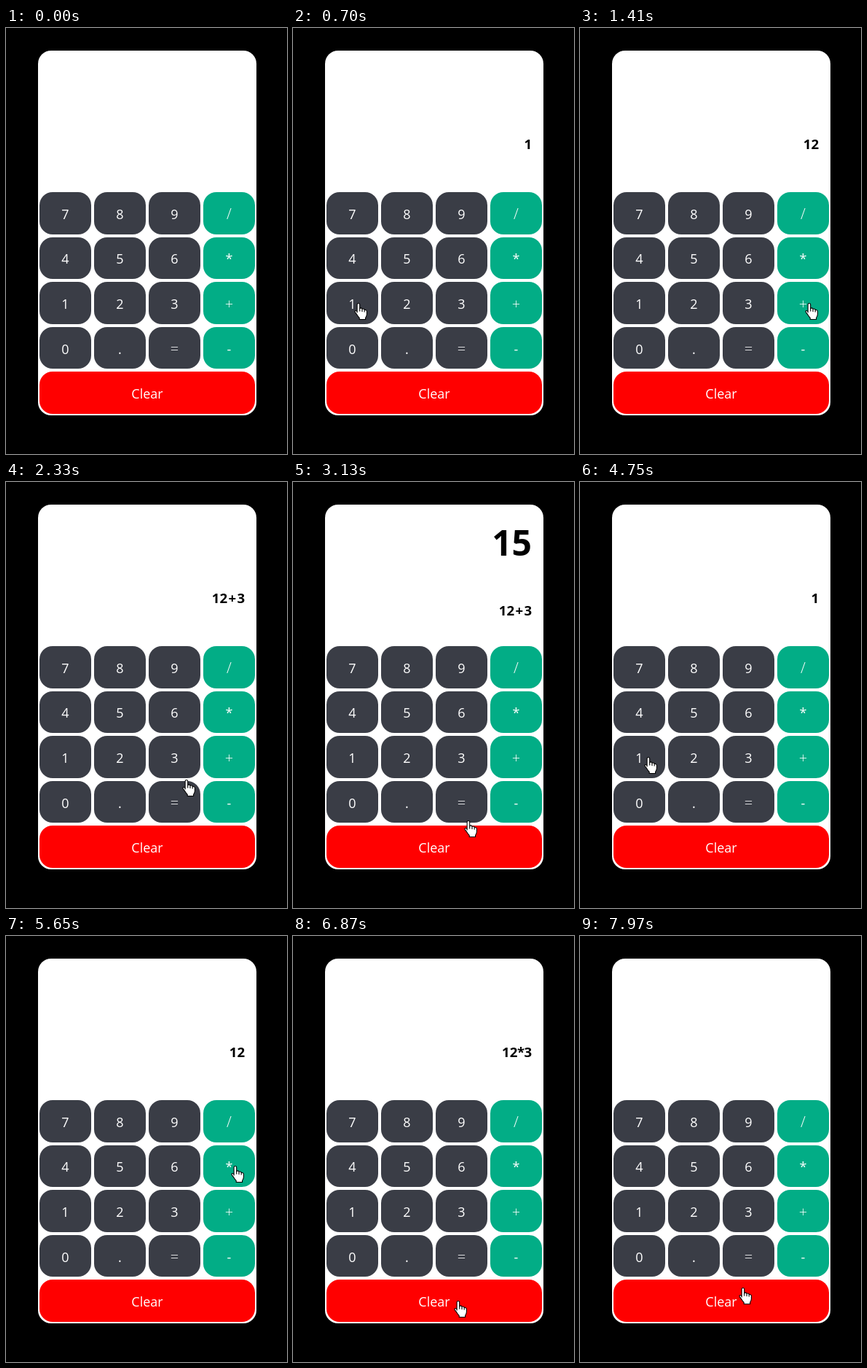
These frames come from a looping animation (386 px wide and 584 px high, 8000 ms). An HTML page:

```html
<!DOCTYPE html>
<html lang="en">
<head>
<meta charset="utf-8">
<title>Calculator</title>
<style>
  html, body { margin: 0; width: 100%; height: 100%; overflow: hidden; background: #000; }
  svg { display: block; width: 386px; height: 584px; }
  text { font-family: "Open Sans", "Noto Sans", sans-serif; text-anchor: middle; }
  .label { fill: #fff; font-size: 18px; }
  .sign { font-size: 20px; font-weight: 300; }
  .display { font-weight: 700; fill: #000; }
</style>
</head>
<body>
<svg viewBox="0 0 386 584">
  <rect width="386" height="584" fill="#000"/>
  <rect x="44" y="31" width="300" height="500" rx="18" fill="#fff"/>
  <g id="keys"></g>
  <g id="expr" class="display" font-size="18.6"></g>
  <text id="result" class="display" x="328" y="101" font-size="48" style="text-anchor:end"></text>
  <g id="cursor" fill="#fff" stroke="#000" stroke-width="1.1" stroke-linejoin="round">
    <path id="arrow" d="M.5 .8V16.5L4.2 13L6.6 18.6L9 17.6L6.6 12.2H11.7Z"/>
    <g id="hand">
      <path d="M-1.9 13V2.2Q-1.9 .5 -.1 .5Q1.7 .5 1.7 2.2V7.6Q2.2 6.8 3.4 6.9Q4.8 7 5 8.4Q5.6 7.8 6.7 8Q8 8.2 8.2 9.5Q8.8 9 9.8 9.4Q11.4 9.9 11.4 11.6V15.5Q11.2 18 9.6 20.3V22.5H1.2V20.4Q-.6 18.6 -2 16.2L-4.6 12.8Q-5.5 11.2 -4.2 10.6Q-3.2 10.3 -1.9 12.2Z"/>
      <path d="M1.7 7.6V11.5M5 8.4V12M8.2 9.5V12.5" fill="none"/>
    </g>
  </g>
</svg>
<script>
const LOOP = 8000, STEP = 100, TRAVEL = 400;
const PANEL_BOTTOM = 531, KEY_W = 71, KEY_H = 57.6, GAP = 4;
const $ = id => document.getElementById(id);

// Places the pointer can visit: every key, plus where it comes in and ends up
const places = { enter: [104, 542], rest: [216, 482] };

function add(parent, tag, attrs, text = "") {
  const el = document.createElementNS("http://www.w3.org/2000/svg", tag);
  for (const k in attrs) el.setAttribute(k, attrs[k]);
  el.textContent = text;
  parent.append(el);
}

function addKey(label, col, row, width, fill) {
  const x = 46 + col * (KEY_W + GAP), top = 225 + row * (KEY_H + GAP);
  const y = Math.round(top), height = Math.round(top + KEY_H) - y;
  const cx = x + width / 2;
  add($("keys"), "rect", { x, y, width, height, rx: 18, fill });
  add($("keys"), "text", {
    x: cx, y: Math.round(top + 36.8), class: "/+=".includes(label) ? "label sign" : "label"
  }, label);
  places[label] = [cx, top + KEY_H / 2];
}

[..."789/456*123+0.=-"].forEach((c, i) =>
  addKey(c, i % 4, Math.floor(i / 4), KEY_W, i % 4 === 3 ? "#02ad86" : "#3a3d46"));
addKey("Clear", 0, 4, 4 * KEY_W + 3 * GAP, "#f00");

// The pointer presses each key at its time, then heads for the next one
const stops = [
  { at: 100, key: "enter" },
  { at: 700, key: "1" }, { at: 1000, key: "2" }, { at: 1630, key: "+" },
  { at: 2130, key: "3" }, { at: 2930, key: "=", dx: 24 }, { at: 3630, key: "Clear", dx: 33, dy: -11 },
  { at: 4650, key: "1" }, { at: 5150, key: "2" }, { at: 5750, key: "*" },
  { at: 6350, key: "3" }, { at: 7470, key: "Clear", dx: 33 },
  { at: 7870, key: "Clear", dx: 33 }, { at: 7970, key: "rest" }
];

const ops = { "+": (a, b) => a + b, "-": (a, b) => a - b, "*": (a, b) => a * b, "/": (a, b) => a / b };

function press(state, key) {
  if (key === "Clear") return { expr: "", result: "" };
  if (key === "=") {
    const [, a, op, b] = state.expr.match(/^([\d.]+)(\D)([\d.]+)$/);
    return { ...state, result: String(ops[op](+a, +b)) };
  }
  return key.length === 1 ? { ...state, expr: state.expr + key } : state;
}

const easeInOut = u => u < 0.5 ? 4 * u ** 3 : 1 - 4 * (1 - u) ** 3;

function tip({ key, dx = 8, dy = 0 }) {
  const [x, y] = places[key];
  return [x + dx, y + dy];
}

function pointerAt(i, elapsed) {
  const from = stops[i], to = stops[i + 1] || from;
  const e = easeInOut(Math.min(1, elapsed / Math.min(TRAVEL, to.at - from.at || TRAVEL)));
  const end = tip(to);
  return tip(from).map((v, k) => Math.round(v + (end[k] - v) * e));
}

const advance = { "+": 13.2, "*": 8.9 };

function showDisplay({ expr, result }) {
  $("result").textContent = result;
  $("expr").replaceChildren();
  let right = 328.2;
  for (const c of [...expr].reverse()) {
    const w = advance[c] || 10.8;
    add($("expr"), "text", { x: right - w / 2, y: result ? 183 : 166 }, c);
    right -= w;
  }
}

let shown;

function render(ms) {
  const t = (ms + 0.5) % LOOP;
  const passed = stops.filter(s => s.at <= t), i = passed.length - 1;
  if (i !== shown) {
    showDisplay(passed.reduce((state, s) => press(state, s.key), { expr: "", result: "" }));
    shown = i;
  }
  $("cursor").style.display = i < 0 ? "none" : "";
  if (i < 0) return;
  const elapsed = Math.floor((t - stops[i].at) / STEP) * STEP;
  const [x, y] = pointerAt(i, elapsed);
  const outside = y > PANEL_BOTTOM;
  $("cursor").setAttribute("transform", `translate(${x} ${y})`);
  $("arrow").style.display = outside ? "" : "none";
  $("hand").style.display = outside ? "none" : "";
}

const begin = performance.now();
function tick() {
  render(performance.now() - begin);
  requestAnimationFrame(tick);
}
tick();
</script>
</body>
</html>
```
